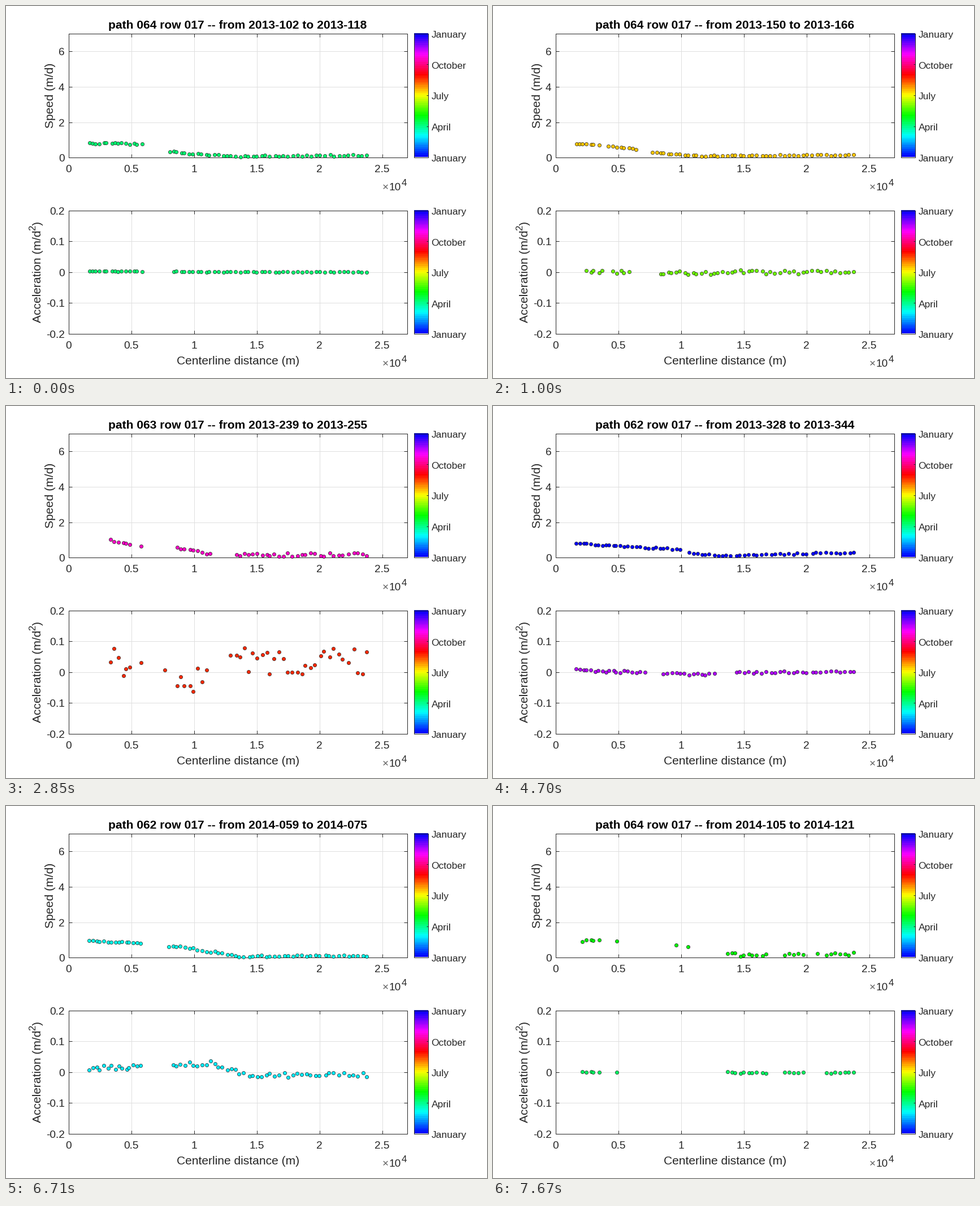
Animation, 851 px wide and 658 px high, one loop 8000 ms. Source, as a matplotlib script:

```python
import colorsys
import numpy as np
import matplotlib.pyplot as plt
from matplotlib.animation import FuncAnimation

W, H, DPI = 851, 658, 64
PT = 72 / DPI                      # points per pixel
LOOP, STEP = 8000, 20
MS_PER_DAY = LOOP / 384            # time runs evenly through the seasons
INK, GRID = "#262626", "#dfdfdf"
LEFT, RIGHT, KM_PX = 111, 710, 22.2
SPEED_PANEL, ACCEL_PANEL = (49, 268), (362, 580)

# Start days of the image pairs, counted from 2013-102
DAYS = [0, 2, 48, 96, 121, 137, 226, 304, 306, 313, 322, 329, 338, 352, 368]
TRACKS = {0: 64, 2: 62, 9: 63}     # each track returns every 16 days

# Key days; everything in between is interpolated
KEYS = [0, 48, 137, 226, 304, 322, 368]
HUES = ([.26, .536, .797, 1, 1.105, 1.18, 1.333],
        [.26, .405, .64, .886, 1.105, 1.155, 1.27])
SPREAD = ([.05, .03, .09, .04, .06, .05, .11],
          [.001, .006, .05, .004, .006, .009, .002])

# Speed (m/d) and acceleration (m/d²) along the glacier on the key days
SPEED_KM = [1.6, 5.8, 8, 10, 11.5, 13.5, 24]
SPEED = [[.80, .75, .33, .20, .10, .04, .13],
         [.77, .54, .25, .15, .06, .09, .13],
         [1.2, .60, .70, .33, .20, .12, .17],
         [.78, .60, .52, .42, .16, .08, .28],
         [.70, .60, .52, .42, .22, .12, .28],
         [.95, .77, .65, .48, .30, .05, .08],
         [.92, 1.0, .85, .60, .30, .15, .18]]
ACCEL_KM = [1.6, 11.5, 14, 24]
ACCEL = [[.003, 0, 0, 0], [.004, -.004, 0, 0], [.06, -.03, .045, .035],
         [.007, -.008, -.002, 0], [0, 0, .003, .003],
         [.01, .03, -.01, -.01], [0, 0, -.002, -.002]]

# Stretches without data in km, for speed and acceleration
GAPS = {48: ([3.7, 4.1, 6.5, 7.5], [0, 2.3, 3.8, 4.3, 5.9, 8.1]),
        137: ([0, 3.2, 4.9, 5.6, 5.9, 7.7, 8, 8.6, 11.3, 12, 12.2, 13],
              [0, 3.1, 4.9, 5.5, 5.8, 7.6, 7.9, 8.5, 11.2, 12.8]),
        226: ([10, 10.4], [7.4, 8.5, 13, 14.4]),
        304: ([2.2, 7.8, 11.2, 12.1, 19.5, 21.3], [0, 2, 2.3, 8.1, 11.1, 13.7, 19.5, 21.3]),
        368: ([0, 2, 3.5, 4.7, 5, 9.5, 9.8, 10.4, 10.7, 13.4, 17, 18, 20, 20.6, 20.9, 21.3],
              [0, 2, 3.5, 4.7, 5, 13.4, 17, 18, 20, 21.3])}
USUAL_GAPS = ([5.9, 7.8], [5.9, 8.1])


def on_day(day, rows):
    return [np.interp(day, KEYS, col) for col in np.transpose(rows)]


def season(f):
    return colorsys.hsv_to_rgb((2 / 3 - f) % 1, 1, 1)


def stations(track, gaps):
    """Sampling distances of a track, widening up-glacier, minus the gaps."""
    n = np.arange(67)
    wobble = np.random.default_rng(track).uniform(-.09, .09, n.size)
    km = np.minimum(1.62 + .29 * n + .0007 * n ** 2 + wobble, 23.75)
    missing = [(a < km) & (km < b) for a, b in zip(gaps[::2], gaps[1::2])]
    return km[~np.any(missing, axis=0)]


def scene(day):
    track = TRACKS[day % 16]
    year, doy = 2013 + (day + 102) // 366, (day + 101) % 365 + 1
    label = f"path {track:03d} row 017 -- from {year}-{doy:03d} to {year}-{doy + 16:03d}"
    tints = [season(np.interp(day, KEYS, h)) for h in HUES]
    noise = np.random.default_rng(day)

    km, km2 = [stations(track, g) for g in GAPS.get(day, USUAL_GAPS)]
    wide, wide2 = [np.interp(day, KEYS, s) for s in SPREAD]
    v = np.interp(km, SPEED_KM, on_day(day, SPEED)) + noise.uniform(-wide, wide, km.size)
    a = np.interp(km2, ACCEL_KM, on_day(day, ACCEL)) + noise.uniform(-wide2, wide2, km2.size)
    clouds = ((LEFT + KM_PX * km, 268 - 31.35 * np.maximum(v, .02)),
              (LEFT + KM_PX * km2, 471 - 545 * a))
    return day * MS_PER_DAY, label, tints, clouds


SCENES = [scene(day) for day in DAYS]

plt.rcParams["font.family"] = "Liberation Sans"
fig = plt.figure(figsize=(W / DPI, H / DPI), dpi=DPI, facecolor="white")
ax = fig.add_axes([0, 0, 1, 1])
ax.axis("off")


def text(x, y, s, size, color=INK, **kw):
    return ax.text(x, y, s, fontsize=size * PT, color=color, va="baseline",
                   rotation_mode="anchor", **kw)


def lines(segments, color):
    """Separate straight lines as one path broken by gaps."""
    pts = np.array([(p, q, (np.nan, np.nan)) for p, q in segments], float).reshape(-1, 2)
    ax.plot(pts[:, 0], pts[:, 1], color=color, lw=PT, solid_capstyle="butt")


def box(x0, x1, y0, y1):
    ax.plot([x0, x1, x1, x0, x0], [y0, y0, y1, y1, y0], color=INK, lw=PT)


def panel(span, yticks):
    top, low = span
    xticks = {f"{k / 2:g}": LEFT + 111 * k for k in range(6)}
    xs = list(xticks.values())[1:]
    ys = [y for y in yticks.values() if top < y < low]
    lines([((x, top), (x, low)) for x in xs]
          + [((LEFT, y), (RIGHT, y)) for y in ys], GRID)
    box(LEFT, RIGHT, top, low)
    lines([((x, e), (x, e + d)) for x in xs for e, d in ((top, 6), (low, -6))]
          + [((e, y), (e + d, y)) for y in ys for e, d in ((LEFT, 6), (RIGHT, -6))], INK)
    for s, x in xticks.items():
        text(x, low + 27, s, 19, ha="center")
    for s, y in yticks.items():
        text(104, y + 7.5, s, 19, ha="right")
    text(666, low + 59, "×", 19, "#606060")
    text(678, low + 59, "10", 19)
    text(700, low + 50, "4", 17)

    bands = np.array([[season(f)] for f in np.linspace(1, 0, 64)])
    ax.imshow(bands, extent=(722, 747, low, top), aspect="auto",
              interpolation="nearest", zorder=1)
    box(722, 747, top, low)
    months = ["January", "October", "July", "April", "January"]
    marks = np.linspace(top, low, 5)
    lines([((744, y), (747, y)) for y in marks[1:-1]], INK)
    for s, y in zip(months, marks):
        text(753, y + 7.5, s, 17.4)


panel(SPEED_PANEL, {"0": 268, "2": 206, "4": 143, "6": 80})
panel(ACCEL_PANEL, {"-0.2": 580, "-0.1": 525, "0": 471, "0.1": 416, "0.2": 362})

text(84.5, 159, "Speed (m/d)", 21, ha="center", rotation=90)
text(62, 561, "Acceleration (m/d", 21, rotation=90)
text(53, 397.5, "2", 17, rotation=90)
text(62, 388, ")", 21, rotation=90)
text(411, 634, "Centerline distance (m)", 21, ha="center")
title = text(410.5, 41, "", 21, "black", ha="center", weight="bold")

dots = [ax.plot([], [], "o", ms=6.2 * PT, mec="#202020", mew=0.7 * PT, zorder=5)[0]
        for _ in SCENES[0][3]]
# Coordinates count pixels from one, with y pointing down
ax.set_xlim(0.5, W + 0.5)
ax.set_ylim(H + 0.5, 0.5)


def draw(i):
    shown = [s for s in SCENES if s[0] < (i + 1) * STEP]
    _, label, tints, clouds = shown[-1]
    title.set_text(label)
    for dot, tint, xy in zip(dots, tints, clouds):
        dot.set_data(*xy)
        dot.set_markerfacecolor(tint)
    return [title, *dots]


anim = FuncAnimation(fig, draw, frames=LOOP // STEP, interval=STEP,
                     repeat=True, repeat_delay=0, blit=False)
plt.show()
```
